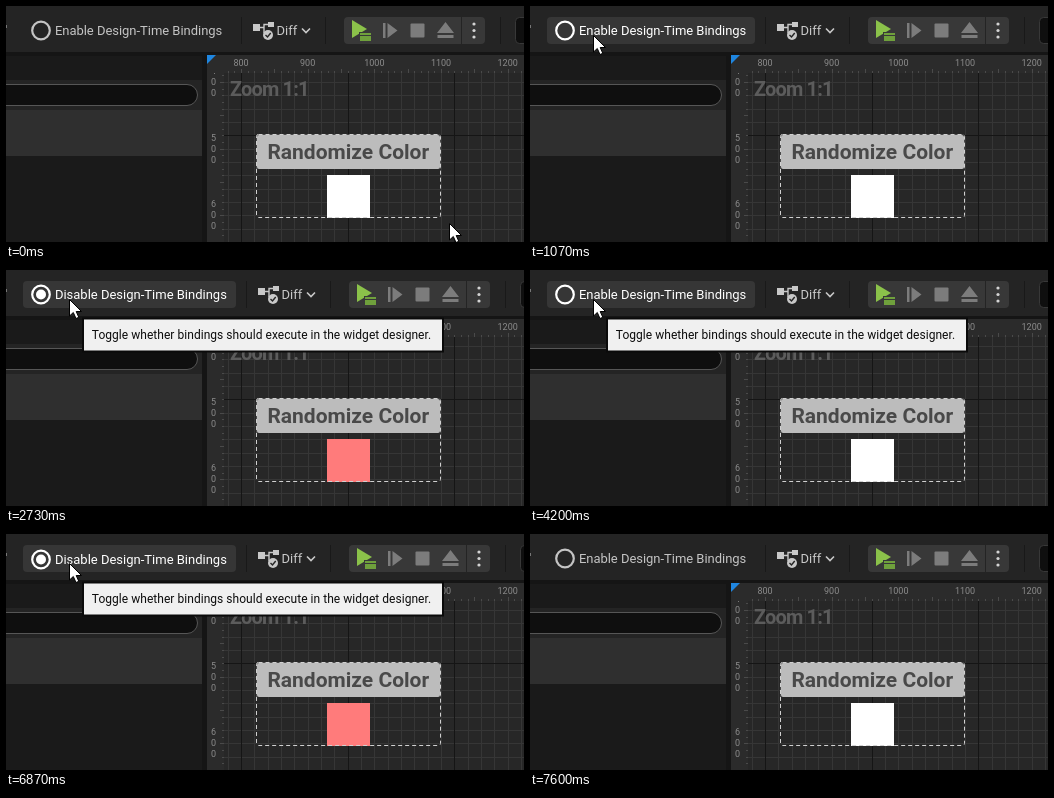
These frames come from a looping animation (518x236 px, 8070 ms). An HTML page:

```html
<!DOCTYPE html>
<html lang="en">
<head>
<meta charset="utf-8">
<title>Design-time bindings</title>
<style>
  html, body { margin: 0; width: 100%; height: 100%; overflow: hidden; background: #1a1a1a; }
  svg { display: block; width: 518px; height: 236px; }
  text { font-family: Roboto, sans-serif; white-space: pre; }
  .ui { font-size: 13px; }
  .ruler { font-size: 9px; fill: #8c8c8c; text-anchor: middle; }
  .tip { font-size: 12px; fill: #0c0c0c; letter-spacing: .04px; }
  .zoom { font-size: 20px; font-weight: 700; fill: #5c5c5c; letter-spacing: -.85px; }
  .caption { font-size: 21px; font-weight: 700; fill: #494949; }
</style>
</head>
<body>
<svg viewBox="0 0 518 236">
  <!-- left panel -->
  <rect width="518" height="236" fill="#151515"/>
  <rect y="50" width="196" height="186" fill="#1a1a1a"/>
  <rect y="74" width="196" height="30" fill="#242424"/>
  <rect y="104" width="196" height="46" fill="#2f2f2f"/>
  <rect id="search" x="-20" y="78.5" width="211.5" height="21" rx="10.5" fill="#0f0f0f"/>

  <!-- designer -->
  <rect x="201" y="49" width="317" height="187" fill="#272727"/>
  <path id="minor" stroke="#363636"/>
  <path id="major" stroke="#151515"/>
  <text class="zoom" x="224" y="90">Zoom 1:1</text>
  <rect x="251" y="129" width="183" height="34" rx="2" fill="#bcbcbc"/>
  <text class="caption" x="261.4" y="153">Randomize Color</text>
  <rect id="swatch" x="321" y="169" width="43" height="43" fill="#fff"/>
  <g fill="none">
    <path d="M250.5 163V130.5a2 2 0 0 1 2-2h180a2 2 0 0 1 2 2V163" stroke="#4a4a4a"/>
    <rect x="250.5" y="128.5" width="184" height="83" rx="2" stroke="#d0d0d0" stroke-dasharray="4 3"/>
  </g>
  <path d="M201 49H218V236H201Z" fill="#2b2b2b"/>
  <g id="sideLabels"></g>
  <path d="M201 49H518V67H201Z" fill="#2b2b2b"/>
  <g id="topLabels"></g>
  <path id="ticks" stroke="#4a4a4a"/>
  <path d="M201 49h9l-9 9z" fill="#1f86e0"/>

  <!-- toolbar -->
  <rect width="518" height="46" fill="#242424"/>
  <rect y="19" width="1" height="3" fill="#777"/>
  <rect id="hover" x="17" y="11" width="208" height="27" rx="4" fill="#363636"/>
  <g id="toggle">
    <circle cx="35" cy="24.5" r="8.8" fill="none" stroke="currentColor" stroke-width="2.2"/>
    <circle id="dot" cx="35" cy="24.5" r="5" fill="currentColor"/>
    <text id="label" class="ui" x="48.9" y="29" fill="currentColor"></text>
  </g>
  <g id="tools">
    <path d="M235.5 11V38M319.5 11V38M494.5 11V38" stroke="#191919"/>
    <g fill="#c8c8c8">
      <path d="M247 18h7v7h-7zM262 16h6v5h-6z"/>
      <circle cx="262" cy="29" r="5"/>
      <path d="M254 21.5h4M262 18.5h-4V27" fill="none" stroke="#c8c8c8" stroke-width="1.4"/>
      <path d="M259.5 29l2 2 3.200-4" fill="none" stroke="#242424" stroke-width="1.4"/>
      <text class="ui" x="270.5" y="29">Diff</text>
      <path d="M296 22.5l4 4 4-4" fill="none" stroke="#c8c8c8" stroke-width="1.6"/>
    </g>
    <rect x="338" y="11" width="141" height="27" rx="4" fill="#383838"/>
    <path d="M455.5 11V38" stroke="#242424"/>
    <path d="M346 14L361 23 346 32Z" fill="#8bc24a"/>
    <rect x="353" y="26" width="13" height="10" fill="#383838"/>
    <path d="M354 27h11v2h-11zM354 30h11v5h-11z" fill="#6fa03c"/>
    <g fill="#7c7c7c">
      <rect x="377" y="17" width="2.5" height="15"/>
      <path d="M381.5 17L391.5 24.5 381.5 32Z"/>
      <rect x="404.5" y="17.5" width="14" height="14" rx="1"/>
      <path d="M439.5 16L448 27H431ZM431.500 29h16v3h-16z"/>
    </g>
    <g fill="#d4d4d4">
      <circle cx="468" cy="18" r="1.6"/>
      <circle cx="468" cy="24.5" r="1.6"/>
      <circle cx="468" cy="31" r="1.6"/>
    </g>
    <rect x="509.5" y="11.5" width="40" height="26" rx="4" fill="#0f0f0f" stroke="#383838"/>
  </g>

  <!-- tooltip -->
  <g id="tip">
    <rect x="76" y="47.5" width="362" height="35" fill="#0a0a0a"/>
    <rect x="78" y="49.5" width="358" height="31" fill="#f0f0f0"/>
    <text class="tip" x="85.8" y="69">Toggle whether bindings should execute in the widget designer.</text>
  </g>

  <!-- pointers -->
  <path id="arrow" d="M-.5 -.5V16L3.300 12.500 6 18.500 8.800 17.300 6.200 11.500H11.500Z" fill="#fff" stroke="#000"/>
  <g id="beam" fill="none">
    <path d="M-3.5 -7.5H3.5M0 -7.5V7.5M-3.5 7.5H3.5" stroke="#000" stroke-width="2.6"/>
    <path d="M-3 -7.5H3M0 -7.5V7.5M-3 7.5H3" stroke="#fff" stroke-width="1.2"/>
  </g>
</svg>
<script>
const LOOP = 8070;
const $ = id => document.getElementById(id);
const set = (id, name, value) => $(id).setAttribute(name, value);
const show = (id, on) => set(id, 'visibility', on ? 'visible' : 'hidden');

// Canvas units to stage pixels
const SCALE = 2 / 3;
const toX = u => 341.67 + (u - 960) * SCALE;
const toY = u => 129.33 + (u - 480) * SCALE;
const crisp = v => Math.round(v) + .5;

function buildGrid() {
  const lines = { minor: '', major: '' };
  for (let u = 380; u <= 1240; u += 20) {
    const kind = u % 160 ? 'minor' : 'major';
    const x = crisp(toX(u)), y = crisp(toY(u));
    if (x > 217 && x < 518) lines[kind] += `M${x} 67V236`;
    if (y > 66 && y < 236) lines[kind] += `M218 ${y}H518`;
  }
  for (const kind in lines) set(kind, 'd', lines[kind]);
}

function addLabel(group, str, x, y) {
  const el = document.createElementNS('http://www.w3.org/2000/svg', 'text');
  el.setAttribute('class', 'ruler');
  el.setAttribute('x', x);
  el.setAttribute('y', y);
  el.textContent = str;
  $(group).append(el);
}

function buildRulers() {
  let ticks = '';
  for (let u = 390; u <= 1230; u += 10) {
    const x = crisp(toX(u)), y = crisp(toY(u)), len = u % 50 ? 2 : 4;
    if (x > 218) ticks += `M${x} 67v-${len}`;
    if (y > 67 && y < 236) ticks += `M218 ${y}h-${len}`;
  }
  set('ticks', 'd', ticks);
  for (let u = 800; u <= 1200; u += 100) addLabel('topLabels', u, toX(u), 60);
  for (let u = 400; u <= 600; u += 100)
    [...String(u)].forEach((digit, i) =>
      addLabel('sideLabels', digit, 207.5, Math.round(toY(u) + 3) + (i - 1) * 11));
}

// Pointer moves: start, end, number of steps, endpoints, easing
const smooth = p => p * p * (3 - 2 * p);
const moves = [
  { t0: 70, t1: 530, n: 8, from: [444, 218], to: [68, 77], ease: smooth },
  { t0: 730, t1: 1070, n: 6, from: [68, 77], to: [64, 30], ease: smooth },
  { t0: 7270, t1: 7600, n: 6, from: [64, 30], to: [300, 244], ease: p => p ** 1.5 },
];

function pointerAt(t) {
  let pos = moves[0].from;
  for (const { t0, t1, n, from, to, ease } of moves) {
    if (t < t0) break;
    const step = Math.floor((t - t0) / (t1 - t0) * (n - 1) + 1e-6) + 1;
    const k = ease(Math.min(1, step / n));
    pos = from.map((v, i) => Math.round(v + (to[i] - v) * k));
  }
  return pos;
}

const within = (t, a, b) => t >= a && t < b;

function render(t) {
  const [x, y] = pointerAt(t);
  const on = within(t, 2730, 4200) || within(t, 5530, 6930);
  const pressed = within(t, 4130, 4200) || within(t, 6870, 6930);
  const hover = x >= 17 && x < 225 && y >= 11 && y < 38;
  const overSearch = t < 1400 && x < 191 && y >= 73 && y < 104;

  $('label').textContent = (on ? 'Disable' : 'Enable') + ' Design-Time Bindings';
  set('label', 'letter-spacing', on ? 0 : -.03);
  set('toggle', 'color', hover ? '#fff' : '#c4c4c4');
  set('toggle', 'transform', `translate(0 ${pressed ? 1 : 0})`);
  set('hover', 'width', on ? 213 : 208);
  set('tools', 'transform', `translate(${on ? 5 : 0} 0)`);
  set('swatch', 'fill', on ? '#ff7b7b' : '#fff');
  set('search', 'stroke', overSearch ? '#5e5e5e' : '#565656');
  show('dot', on);
  show('hover', hover);
  show('tip', t >= 1400 && hover);

  show('beam', overSearch);
  show('arrow', !overSearch && t < 7600);
  for (const id of ['arrow', 'beam']) set(id, 'transform', `translate(${x} ${y})`);
}

buildGrid();
buildRulers();
const start = performance.now();
function tick() {
  render((performance.now() - start) % LOOP);
  requestAnimationFrame(tick);
}
tick();
</script>
</body>
</html>
```
